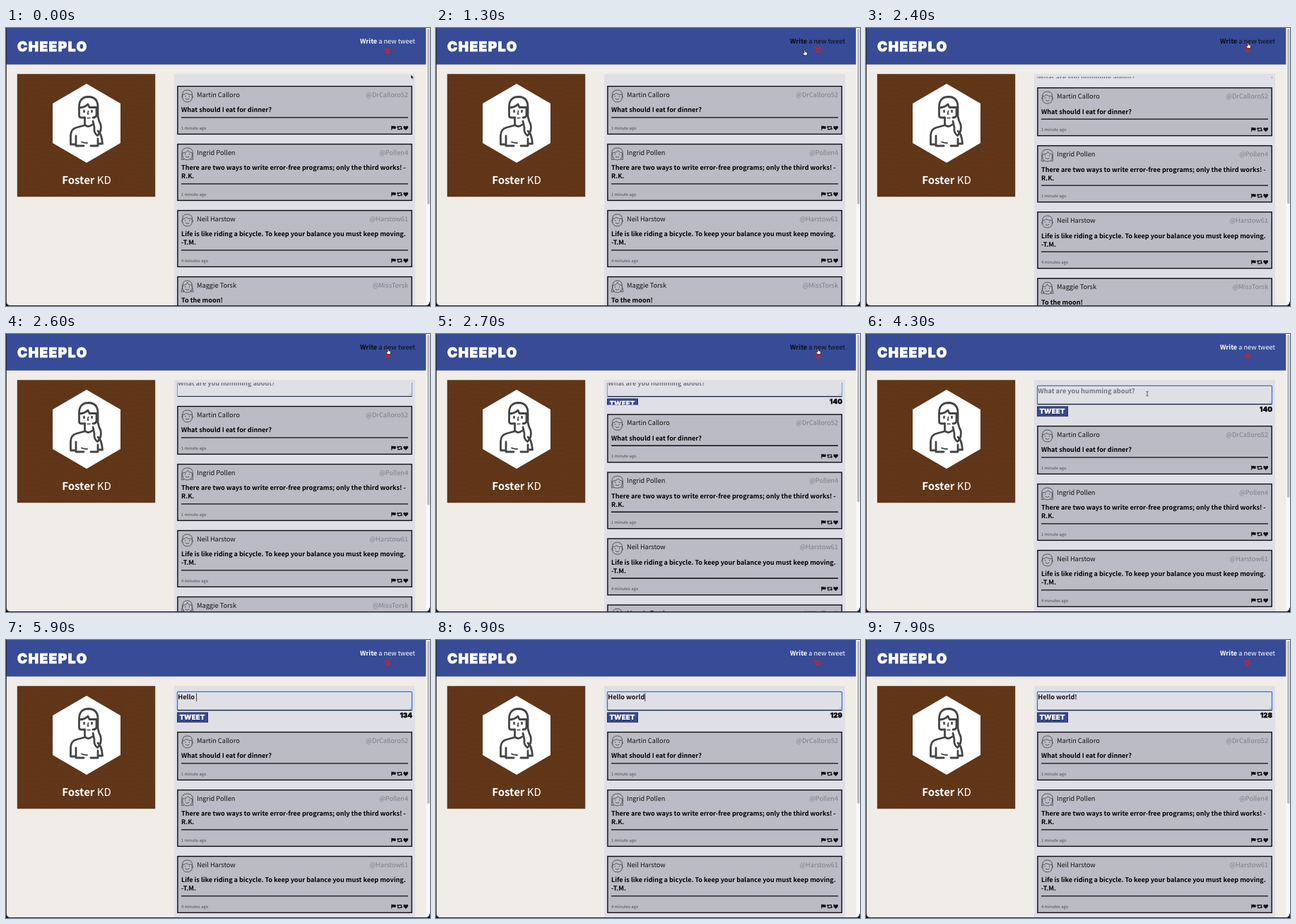
Animation of 600 by 394 pixels, one loop 8000 ms. Source, as an HTML page:

```html
<!DOCTYPE html>
<html lang="en">
<head>
<meta charset="utf-8">
<title>Message board</title>
<style>
  html, body { margin: 0; width: 100%; height: 100%; overflow: hidden; background: #f0ece8; }
  svg { display: block; width: 600px; height: 394px; }
  text {
    font-family: "Noto Sans CJK JP", "Noto Sans CJK SC", "Noto Sans CJK KR", "Source Sans 3", "Open Sans", sans-serif;
    text-rendering: geometricPrecision;
    white-space: pre;
  }
  .light { font-weight: 300; }
  .bold { font-weight: 700; }
  .end { text-anchor: end; }
  .block { font-family: Inter, "Open Sans", sans-serif; font-weight: 900; }
  .line { fill: none; stroke-linecap: round; stroke-linejoin: round; }
</style>
</head>
<body>
<svg viewBox="0 0 600 394" xmlns="http://www.w3.org/2000/svg">
  <defs>
    <pattern id="wood" width="46" height="7" patternUnits="userSpaceOnUse">
      <rect width="46" height="7" fill="#613619"/>
      <path d="M0 1.5H30M12 4.5H46" stroke="#5a3212" stroke-width=".7" opacity=".6"/>
    </pattern>
    <clipPath id="formClip"><rect id="formWindow" x="238" y="69" width="341" height="0"/></clipPath>
  </defs>

  <rect width="600" height="394" fill="#f0ece8"/>
  <rect x="238" y="65" width="341" height="329" fill="#dfe0e6"/>

  <g id="form" clip-path="url(#formClip)">
    <g id="formBody">
      <rect id="ring" x="242.5" y="73.3" width="332" height="26" rx="1" fill="#dfe0e6"/>
      <path d="M242.500 99.600H574.500" stroke="#1b2540" stroke-width="1.100"/>
      <path d="M570.500 97.800l3-3M572.300 98l1.400-1.400" stroke="#888" stroke-width=".5"/>
      <text id="entry" class="bold" x="243.300" y="84" font-size="9.150"></text>
      <path id="caret" d="M0 75.500V87" stroke="#111" stroke-width=".8"/>
      <rect x="242.500" y="102.900" width="43" height="13.800" fill="#374b97" stroke="#26315f"/>
      <text class="block" x="246" y="114" font-size="9.800" fill="#10183a">TWEET</text>
      <text class="block" x="245.400" y="113.200" font-size="9.800" fill="#fff" stroke="#fff" stroke-width=".2">TWEET</text>
      <text id="count" class="block end" x="575" y="110.200" font-size="9.600" stroke="#000" stroke-width=".3"></text>
    </g>
  </g>

  <g id="cards"></g>

  <rect width="594.500" height="51.700" fill="#374b97"/>
  <text class="block" x="16" y="32.600" font-size="19" letter-spacing="1.500" fill="#fff" stroke="#fff" stroke-width=".8">CHEEPLO</text>
  <text id="link" class="light end" x="579" y="22.200" font-size="9.200"><tspan class="bold">Write</tspan> a new tweet</text>
  <path id="chevron" class="line" d="M-3.400-3.600L0-.8 3.400-3.600M-3.400.6L0 3.400 3.400.6" stroke="#d0202a" stroke-width="1.900"/>

  <rect x="15.800" y="65.200" width="195.400" height="174" fill="url(#wood)"/>
  <path d="M114 79L162 107V163L114 191 66 163V107Z" fill="#fff"/>
  <g class="line" stroke="#454545" stroke-width="2.800">
    <path d="M103.500 113Q103 97.500 117 97.500Q130 98 130 112V125Q131 131 134 137Q136 146 129.500 152.500Q124 149 125 141L123 132"/>
    <path d="M103.500 113V124Q103.500 127 106.500 127H111.500M103.500 113Q112 112.500 116 108L118 112.500H129M128 114V124Q127 127 123 127"/>
    <path d="M111.500 127V137Q116 142 122 137M111 138L100 141Q92 143 91.500 152V165H98M99 153V167H110M130 146Q135.500 150 136.500 164H131M130 157V167H120"/>
    <path d="M107 161.500Q110 163 115 163" stroke-width="1.800"/>
    <path d="M110.500 117V119M121.500 117V119" stroke-width="2.600"/>
    <path d="M116.500 117.500L115.500 122H117M115 127.500H119" stroke-width="1.600"/>
  </g>
  <text class="light" x="114" y="220.800" font-size="15" fill="#fff" text-anchor="middle"><tspan class="bold">Foster</tspan> KD</text>

  <rect x="594.500" width="5.500" height="394" fill="#f8f8f8"/>
  <rect id="thumb" x="596" y="1" width="3.400" rx="1.700" fill="#bdbdbf"/>
  <path d="M0 388V394H6Q.8 393.200 0 388ZM600 388V394H594Q599.200 393.200 600 388Z" fill="#111"/>
  <path d="M.4 0V388Q.8 393.400 6 393.500H594Q599.200 393.400 599.600 388" fill="none" stroke="#1c1c1c" stroke-width=".9"/>

  <g id="arrow"><path d="M0 0V6.200L1.500 4.900 2.500 7 3.500 6.500 2.500 4.500H4.400Z" fill="#111" stroke="#fff" stroke-width=".5"/></g>
  <g id="hand"><path d="M-1-3.600Q-.2-4.400.5-3.600V-1.200L2.800-.6Q3.600-.2 3.500.8L2.800 3.800H-1L-3 .9Q-3.200-.2-2.200 0L-1 .9Z" fill="#fff" stroke="#111" stroke-width=".7"/></g>
  <g id="beam"><path d="M-1.500-3.200Q0-3.200 0-2.400Q0-3.200 1.500-3.200M0-2.400V2.400M-1.500 3.200Q0 3.200 0 2.400Q0 3.200 1.500 3.200" fill="none" stroke="#222" stroke-width=".7"/></g>
</svg>

<script>
const $ = id => document.getElementById(id);
const LOOP = 8000, STEP = 100;
const FIRST_CARD = 81.6, FORM_HEIGHT = 48, SLIDE_START = 2310, SLIDE_TIME = 650;
const MESSAGE = "Hello world!";
const KEYS = [4700, 4900, 5100, 5200, 5400, 5700, 6100, 6300, 6500, 6600, 6800, 7200];
const FOCUS = 2800, HOVER = [800, 3300];

// time, x, y
const POINTER = [[0, 573, 66], [300, 572, 64], [900, 530, 37], [1300, 522, 35], [1700, 524, 33],
  [2200, 541, 25], [3100, 541, 25], [3500, 500, 50], [4100, 398, 84.7], [8000, 398, 84.7]];

const POSTS = [
  { name: "Martin Calloro", handle: "@DrCalloro52", lines: ["What should I eat for dinner?"], age: "1 minute ago", hair: "short" },
  { name: "Ingrid Pollen", handle: "@Pollen4", lines: ["There are two ways to write error-free programs; only the third works! -", "R.K."], age: "1 minute ago", hair: "long" },
  { name: "Neil Harstow", handle: "@Harstow61", lines: ["Life is like riding a bicycle. To keep your balance you must keep moving.", "-T.M."], age: "4 minutes ago", hair: "short" },
  { name: "Maggie Torsk", handle: "@MissTorsk", lines: ["To the moon!"], age: "6 minutes ago", hair: "tails" }
];

const HAIR = {
  short: "M-7 0Q-8-8.500 0-8.500Q8-8.500 7 0M-6.500-2Q-3-1.500-2-4Q2-1.500 6.500-2M-7 0Q-9.500.5-6.800 3M7 0Q9.500.5 6.800 3",
  long: "M-7.800 8V-1Q-7.800-8.500 0-8.500Q7.800-8.500 7.800-1V8H5M-7.800 8H-5M-6.500-1.500Q0-2 1-5Q3-1.500 6.500-1.500",
  tails: "M-6.800 0Q-7-8.500 0-8.500Q7-8.500 6.800 0M-6.500-2Q0-2 0-6Q1-2 6.500-2M-6.800 0L-8.500 7.500H-5V5M6.800 0L8.500 7.500H5V5"
};

const face = hair => `<g class="line" transform="translate(256.600 14.800)" stroke="#4c4d53" stroke-width=".9">
  <path d="M-6.800-1V2Q-6.500 8.500 0 8.500Q6.500 8.500 6.800 2V-1"/><path d="${HAIR[hair]}"/>
  <path d="M-2.900 0V.8M2.900 0V.8M-2.500 4Q0 6 2.500 4"/></g>`;

const icons = y => `<g transform="translate(0 ${y})" fill="#111">
  <path d="M545.200-3V3.200H546.200V1.300Q548 .5 549 1.200 550.500 1.600 551.600.8V-2.700Q550-1.900 549-2.500 547.500-3.100 546.200-2.400V-3Z"/>
  <path d="M554.700-1V2H558M556-2H559.500V1.200" fill="none" stroke="#111" stroke-width="1.200"/>
  <path d="M552.600-.6L554.700-3 556.800-.6ZM557.400.6L559.500 3 561.600.6Z"/>
  <path d="M565.700 3.300L562.700.3Q561.600-1.500 563-2.600 564.500-3.400 565.700-1.700 566.900-3.400 568.400-2.600 569.800-1.500 568.700.3Z"/></g>`;

function card(post, y) {
  const extra = (post.lines.length - 1) * 12;
  const body = post.lines.map((s, i) =>
    `<text class="bold" x="248" y="${37.7 + i * 12}" font-size="9.070">${s}</text>`).join("");
  return `<g transform="translate(0 ${y})">
    <rect x="242.900" y="1" width="331.300" height="${67.8 + extra}" fill="#babbc4" stroke="#0c0c0e" stroke-width="1.400"/>
    ${face(post.hair)}
    <text class="light" x="270" y="16" font-size="9.200" fill="#111">${post.name}</text>
    <text class="light end" x="569" y="16" font-size="9.200" fill="#7d7e86">${post.handle}</text>
    ${body}
    <path d="M248 ${45.3 + extra}H569" stroke="#0c0c0e" stroke-width="1.400"/>
    <text class="light" x="248" y="${62 + extra}" font-size="5.870" fill="#4a4a50">${post.age}</text>
    ${icons(60 + extra)}</g>`;
}

let cardTop = FIRST_CARD;
$("cards").innerHTML = POSTS.map(post => {
  const y = cardTop;
  cardTop += 70 + post.lines.length * 12;
  return card(post, y);
}).join("");

const clamp = v => Math.max(0, Math.min(1, v));
const swing = p => 0.5 - Math.cos(Math.PI * clamp(p)) / 2;
const show = (id, on) => { $(id).style.display = on ? "" : "none"; };
const move = (id, x, y, more = "") => $(id).setAttribute("transform", `translate(${x} ${y}) ${more}`);

function pointerAt(t) {
  const i = POINTER.findIndex(p => p[0] > t);
  const [t0, x0, y0] = POINTER[i - 1], [t1, x1, y1] = POINTER[i];
  const k = swing((t - t0) / (t1 - t0));
  return [x0 + (x1 - x0) * k, y0 + (y1 - y0) * k];
}

function drawForm(t) {
  const h = FORM_HEIGHT * swing((t - SLIDE_START) / SLIDE_TIME);
  $("formWindow").setAttribute("height", h);
  move("formBody", 0, -Math.min(11, FORM_HEIGHT - h));
  move("cards", 0, h);
  $("thumb").setAttribute("height", 249 - 18 * h / FORM_HEIGHT);

  const focus = clamp((t - 2700) / 500);
  $("ring").setAttribute("stroke", focus < 1 ? "#6f8cd6" : "#3a70cc");
  $("ring").setAttribute("stroke-width", 0.9 + 0.4 * focus);
}

function drawText(t) {
  const n = KEYS.filter(k => k <= t).length;
  const entry = $("entry");
  entry.textContent = n ? MESSAGE.slice(0, n) : "What are you humming about?";
  entry.setAttribute("fill", n ? "#111" : "#74757b");
  $("count").textContent = 140 - n;

  const since = t - (n ? KEYS[n - 1] : FOCUS);
  show("caret", since >= 0 && Math.floor(since / 500) % 2 === 0);
  move("caret", 243.8 + (n ? entry.getComputedTextLength() : 0), 0);
}

function drawPointer(t) {
  const [x, y] = pointerAt(t);
  const hover = t >= HOVER[0] && t < HOVER[1];
  const inField = t > HOVER[1] && y > 73;
  show("hand", hover);
  show("beam", inField && t < KEYS[0]);
  show("arrow", !hover && !inField);
  ["hand", "beam", "arrow"].forEach(id => move(id, x, y));
  $("link").setAttribute("fill", hover ? "#0b0b0f" : "#fff");
}

function draw(now) {
  const t = Math.floor(Math.max(0, now) % LOOP / STEP) * STEP;
  drawForm(t);
  drawText(t);
  drawPointer(t);
  const sway = Math.cos(2 * Math.PI * t / 1000);
  move("chevron", 540, 31.2 + 1.3 * sway, `rotate(${(-15 * sway).toFixed(2)})`);
}

const start = performance.now();
function tick() {
  draw(performance.now() - start);
  requestAnimationFrame(tick);
}
tick();
</script>
</body>
</html>
```
